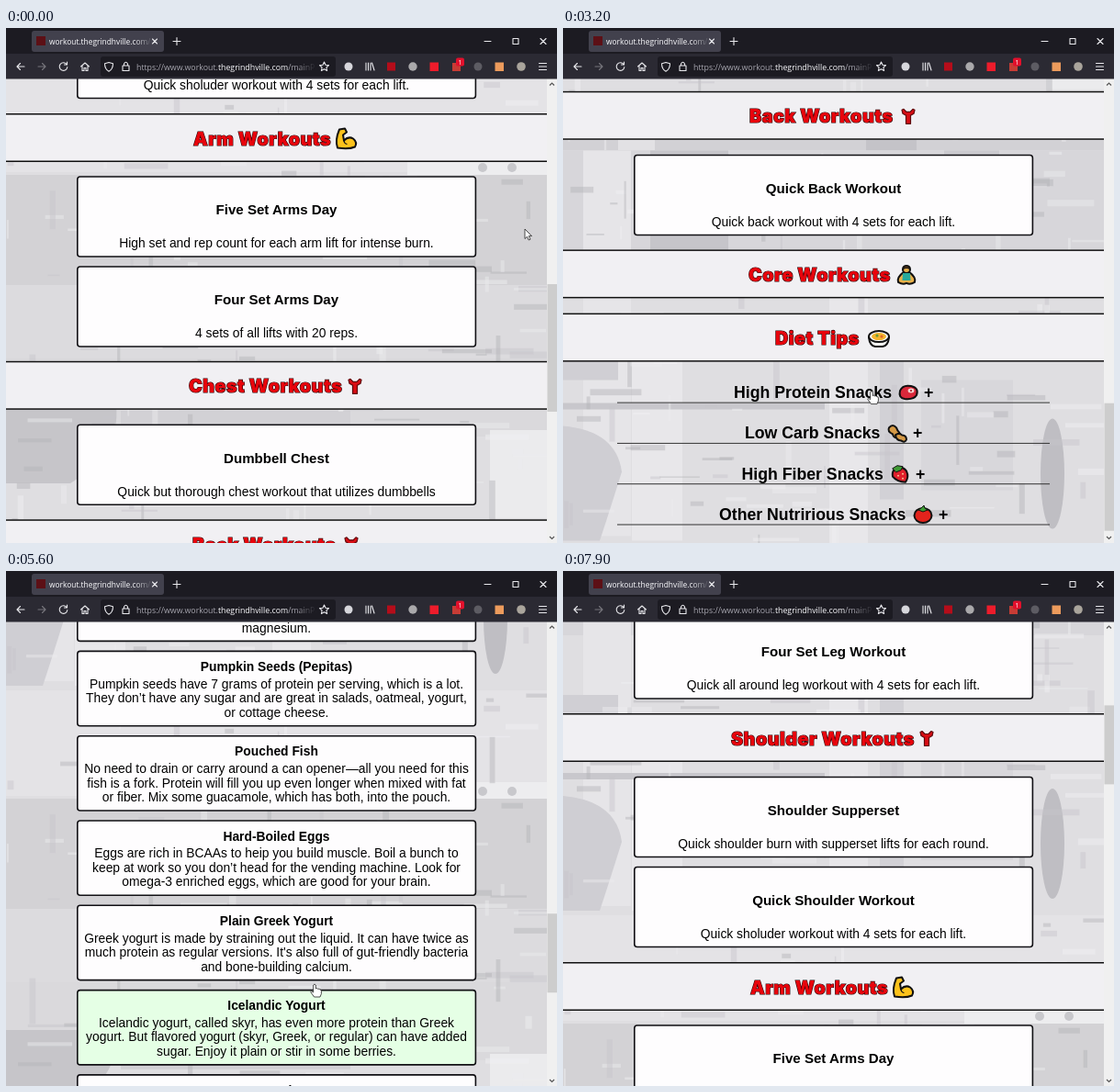
Recreate the animation shown at these times as an HTML page. Size 600 by 561 pixels, loop 8000 ms.

```html
<!DOCTYPE html>
<html lang="en">
<head>
<meta charset="utf-8">
<title>Workouts</title>
<style>
  html, body { margin: 0; width: 100%; height: 100%; overflow: hidden; background: #dfdee1; }
  svg { display: block; width: 600px; height: 561px; }
  .page text { font-family: "Liberation Sans", Arial, sans-serif; font-size: 13.85px; fill: #000; }
  .page .title { font-size: 15.1px; font-weight: 700; }
  .page .bold { font-weight: 700; }
  .page .snack { font-size: 17.7px; font-weight: 700; }
  .page .head { font: 900 19.7px "Arial Black", Inter, sans-serif; letter-spacing: .5px; fill: #e8040c; stroke: #2a0508; stroke-width: 1.2px; paint-order: stroke; }
  .card rect { fill: #fefdfe; stroke: #111014; stroke-width: 1.6; }
  .card.hover rect { fill: #e5ffe5; }
  .icon { stroke: #111; stroke-width: 2; stroke-linejoin: round; stroke-linecap: round; }
  .chrome text { font-family: "Open Sans", "Noto Sans", sans-serif; font-size: 8.8px; fill: #fbfbfe; }
  .chrome .tab { font-size: 8.4px; }
  .chrome .badge { font-size: 7.5px; }
  .chrome .dim { fill: #a5a4ad; }
  .line { fill: none; stroke: #e8e8ec; stroke-width: 1.1; stroke-linecap: round; stroke-linejoin: round; }
</style>
</head>
<body>
<svg id="stage" viewBox="0 0 600 561" xmlns="http://www.w3.org/2000/svg"></svg>
<script>
const LOOP = 8000, STEP = 100, OPEN_AT = 4000, TILE = 988;

const rect = (x, y, w, h, fill, extra = '') =>
  `<rect x="${x}" y="${y}" width="${w}" height="${h}" fill="${fill}" ${extra}/>`;
const circle = (x, y, r, fill) => `<circle cx="${x}" cy="${y}" r="${r}" fill="${fill}"/>`;
const ellipse = (x, y, rx, ry, fill) =>
  `<ellipse cx="${x}" cy="${y}" rx="${rx}" ry="${ry}" fill="${fill}"/>`;
const path = (d, fill, extra = '') => `<path d="${d}" fill="${fill}" ${extra}/>`;
const line = (d, extra = '') => path(d, 'none', `class="line" ${extra}`);
const text = (x, y, label, cls = '', anchor = 'middle') =>
  `<text x="${x}" y="${y}" class="${cls}" text-anchor="${anchor}">${label}</text>`;

// Small pictograms, each centred on 0,0
const icons = {
  arm: path('M-8-10L-2-11L0-7L-4-4L-3 2Q2-3 7 0Q12 4 9 9Q2 12-10 10Q-13 2-8-10Z', '#fcc21b') +
    path('M-3 2Q-3 5 0 6', 'none', 'stroke-width="1.2"'),
  torso: path('M-7-7L-5-8L-2-5H2L5-8L7-7L6-3L2.500-1V8H-2.500V-1L-6-3Z', '#d80d14', 'stroke="#5d090c" stroke-width="1.2"'),
  yoga: path('M-3-3Q-11 3-9 8Q-4 11 0 9Q4 11 9 8Q11 3 3-3Z', '#e8b04a') + circle(0, -6, 4, '#e8b04a') +
    path('M-4-6Q0-14 4-6Q0-9-4-6', '#5a3a1e', 'stroke-width="1"') +
    path('M-4-2H4L4.500 6H-4.500Z', '#27a99b', 'stroke="none"'),
  bowl: path('M-11-1Q-10 8-4 9H4Q10 8 11-1Z', '#f4f4f2') + ellipse(0, -2, 11, 6, '#fff') +
    `<g stroke="none">${ellipse(0, -2, 8, 4, '#f3b52f')}${circle(-2, -3, 1.6, '#6a9b3a')}${circle(3, -2, 1.6, '#e2662b')}</g>`,
  steak: path('M-9-2Q-6-9 3-7Q12-5 9 3Q6 8-4 7Q-11 6-9-2Z', '#d9283a') +
    `<g stroke="none">${ellipse(3, -2, 3.4, 2.5, '#f6d6d2')}${circle(3, -2, 1.1, '#a3202c')}</g>`,
  peanuts: path('M-9-6Q-5-11-1-6Q0-3 2-1Q5 3 0 5Q-4 5-5 1Q-11-2-9-6Z', '#d69a46') +
    path('M-2 2Q2-1 5 2Q10 2 10 7Q8 11 4 8Q-1 8-2 2Z', '#d69a46'),
  berry: path('M-6-5Q2-10 7-3Q10 3 6 9Q-3 9-8 3Q-9-2-6-5Z', '#e0202b') +
    path('M-8-6L-3-9L3-8L1-4L-4-2Z', '#3f9b35', 'stroke-width="1"') +
    `<g stroke="none">${circle(-2, 2, .9, '#ffd9a0')}${circle(3, 0, .9, '#ffd9a0')}${circle(3, 5, .9, '#ffd9a0')}</g>`,
  tomato: ellipse(0, 1, 9.5, 8, '#e3231c') +
    path('M-5-5L0-3L5-5L2-7L1-10L-2-7Z', '#3f9b35', 'stroke-width="1"')
};
const icon = (name, x, y) => `<g class="icon" transform="translate(${x} ${y})">${icons[name]}</g>`;

const band = (y, x, label, iconName, iconX) =>
  rect(0, y, 589, 52, '#f1f0f3') + rect(0, y - .5, 589, 1.5, '#111') + rect(0, y + 51, 589, 1.5, '#111') +
  text(x, y + 34, label, 'head', 'start') + icon(iconName, iconX, y + 27);

const cardAreas = [];
function card(y, h, body, food = false) {
  cardAreas.push({ y, h, food });
  return `<g class="card"><rect x="77.8" y="${y}" width="433.6" height="${h}" rx="3"/>${body}</g>`;
}
const workout = (y, title, note) =>
  card(y, 87, text(294.5, y + 41.3, title, 'title') + text(294.5, y + 77.3, note));
const snackHead = (y, x, label, iconName, iconX, sign) =>
  text(x, y, label, 'snack', 'start') + icon(iconName, iconX, y - 6) +
  text(iconX + 17, y, sign, 'snack', 'start') + rect(59, y + 4.5, 471, 1, '#333');

const foods = [
  ['Edamame', 'They have protein, complex carbs, and fat to give you long-lasting', 'energy. Soybeans also are full of folate, vitamin K, iron, and', 'magnesium.'],
  ['Pumpkin Seeds (Pepitas)', 'Pumpkin seeds have 7 grams of protein per serving, which is a lot.', 'They don’t have any sugar and are great in salads, oatmeal, yogurt,', 'or cottage cheese.'],
  ['Pouched Fish', 'No need to drain or carry around a can opener—all you need for this', 'fish is a fork. Protein will fill you up even longer when mixed with fat', 'or fiber. Mix some guacamole, which has both, into the pouch.'],
  ['Hard-Boiled Eggs', 'Eggs are rich in BCAAs to heip you build muscle. Boil a bunch to', 'keep at work so you don’t head for the vending machine. Look for', 'omega-3 enriched eggs, which are good for your brain.'],
  ['Plain Greek Yogurt', 'Greek yogurt is made by straining out the liquid. It can have twice as', "much protein as regular versions. It's also full of gut-friendly bacteria", 'and bone-building calcium.'],
  ['Icelandic Yogurt', 'Icelandic yogurt, called skyr, has even more protein than Greek', 'yogurt. But flavored yogurt (skyr, Greek, or regular) can have added', 'sugar. Enjoy it plain or stir in some berries.'],
  ['Cottage Cheese', 'Cottage cheese is full of protein and calcium and is easy to carry to', 'work. Top it with fruit, seeds, or a few slices of tomato for a quick', 'and filling snack.'],
  ['Hummus', 'Chickpeas have both protein and fiber, so they keep you full between', 'meals. Dip carrots, peppers, or celery for some crunch and', 'extra vitamins.'],
  ['Almonds', 'A small handful has plenty of protein along with healthy fats. Keep', 'a bag at your desk so you have something ready when you', 'feel hungry.']
];
const foodCard = ([title, ...lines], i) => {
  const y = 895.1 + i * 92.3;
  return card(y, 81.3, text(294.5, y + 21.6, title, 'bold') +
    lines.map((s, n) => text(294.5, y + 40.2 + n * 15.6, s)).join(''), true);
};

// Faded gym backdrop, one repeating tile
function backdrop() {
  let seed = 7;
  const rnd = () => (seed = seed * 16807 % 2147483647) / 2147483647;
  let s = rect(0, 0, 589, TILE, '#dfdee1') +
    rect(0, 0, 589, 125, '#d7d6da') + rect(95, 0, 85, 110, '#c6c5ca') + rect(200, 30, 330, 9, '#c8c7cc') +
    rect(415, 0, 60, 65, '#cac9ce') + rect(22, 0, 52, 420, '#e6e5e8') +
    rect(0, 190, 60, 60, '#d0cfd4') +
    rect(75, 225, 55, 200, '#e8e7ea') + rect(290, 110, 42, 320, '#e8e7ea') + rect(345, 190, 26, 190, '#d2d1d6') +
    rect(0, 275, 285, 7, '#c8c7cc') + path('M0 300Q58 305 64 350Q50 395 40 425H0Z', '#cfced3') +
    rect(390, 250, 100, 120, '#d8d7db') + ellipse(533, 352, 13, 60, '#bfbec3') +
    rect(0, 430, 589, 115, '#e4e3e6') + rect(437, 530, 152, 20, '#ededef') +
    circle(519, 540, 5, '#c8c8cc') + circle(551, 540, 5, '#c8c8cc') +
    rect(0, 548, 589, 120, '#d3d2d5') + rect(0, 668, 589, 80, '#dcdbde') +
    rect(0, 748, 589, 85, '#dad9dc') + path('M0 800H120Q125 850 70 884H0Z', '#c6c5c9') +
    rect(125, 805, 250, 38, '#d2d1d5') + rect(527, 826, 62, 96, '#ebebed') +
    rect(0, 924, 589, 64, '#d2d1d5') + rect(60, 924, 40, 64, '#e2e1e4') + rect(330, 930, 55, 58, '#c4c3c8');
  const shades = ['#f0eff2', '#c5c4c9', '#b2b1b6', '#ebeaed'];
  for (let i = 0; i < 340; i++) {
    const upright = rnd() < .4, len = 8 + rnd() * 50, thick = 1.5 + rnd() * 6;
    const x = rnd() * 575, y = rnd() * (TILE - 20);
    const w = Math.min(upright ? thick : len, 589 - x), h = Math.min(upright ? len : thick, TILE - y);
    s += rect(x.toFixed(1), y.toFixed(1), w.toFixed(1), h.toFixed(1), shades[Math.floor(rnd() * 4)], 'opacity=".45"');
  }
  return s;
}

const page = [
  workout(-281, 'Four Set Leg Workout', 'Quick all around leg workout with 4 sets for each lift.'),
  band(-177.5, 183, 'Shoulder Workouts', 'torso', 396),
  workout(-108.5, 'Shoulder Supperset', 'Quick shoulder burn with supperset lifts for each round.'),
  workout(-10.5, 'Quick Shoulder Workout', 'Quick sholuder workout with 4 sets for each lift.'),
  band(93.5, 204, 'Arm Workouts', 'arm', 371),
  workout(162, 'Five Set Arms Day', 'High set and rep count for each arm lift for intense burn.'),
  workout(260, 'Four Set Arms Day', '4 sets of all lifts with 20 reps.'),
  band(363.3, 199, 'Chest Workouts', 'torso', 380),
  workout(432.2, 'Dumbbell Chest', 'Quick but thorough chest workout that utilizes dumbbells'),
  band(535.8, 203, 'Back Workouts', 'torso', 376),
  workout(605, 'Quick Back Workout', 'Quick back workout with 4 sets for each lift.'),
  band(708.4, 202, 'Core Workouts', 'yoga', 374),
  band(777.6, 231, 'Diet Tips', 'bowl', 344)
].join('');

const closedList = [
  [186, 'High Protein Snacks', 'steak', 376],
  [198, 'Low Carb Snacks', 'peanuts', 364],
  [194.5, 'High Fiber Snacks', 'berry', 367],
  [170, 'Other Nutririous Snacks', 'tomato', 392]
].map(([x, label, ic, ix], i) => snackHead(869.6 + i * 44.3, x, label, ic, ix, '+')).join('');
const openList = snackHead(869.6, 188, 'High Protein Snacks', 'steak', 378, '-') + foods.map(foodCard).join('');

const address = '<tspan class="dim">https://www.workout.</tspan>thegrindhville.com<tspan class="dim">/mainPage</tspan>';
const chrome = rect(0, 0, 600, 28, '#1c1b22') + rect(0, 28, 600, 27.5, '#2b2a33') +
  rect(28, 3, 144, 23, '#42414d', 'rx="3"') + rect(33, 9, 10, 10, '#5c1016') +
  `<g mask="url(#tabFade)">${text(47, 17.6, 'workout.thegrindhville.com/mainPage', 'tab', 'start')}</g>` +
  line('M159.5 12l5 5m0-5l-5 5M182 14.5h8m-4-4v8M521 14.5h7M552 11.5h6v6h-6zM582 11.5l6 6m0-6l-6 6') +
  line('M20 42h-8m3.5-3.5l-3.5 3.5l3.5 3.5') +
  line('M35 42h8m-3.5-3.5l3.5 3.5l-3.5 3.5', 'opacity=".4"') +
  line('M66 39.5a4.3 4.3 0 1 0 .8 3M66.5 37v3h-3M81.5 42l4.5-4l4.5 4M83 41v5.5h2v-3h2v3h2V41') +
  rect(103, 31, 256, 22, '#1c1b22', 'rx="3"') +
  line('M112 37.5l4.5 1.2q0 6-4.5 8.5q-4.5-2.5-4.5-8.5zM127 41h7v5.5h-7zM128.5 41v-2q2-3.5 4 0v2') +
  `<g mask="url(#urlFade)">${text(142, 45.5, address, '', 'start')}</g>` +
  line('M346.5 37l1.5 3.2l3.5.4l-2.6 2.4l.7 3.5l-3.1-1.8l-3.1 1.8l.7-3.5l-2.6-2.4l3.5-.4z') +
  circle(373, 42, 4.5, '#d7d7dc') +
  line('M392 38v8m2.5-8v8m2.5-8v8m1.5-8l2.5 8') +
  rect(415, 37.5, 9, 9, '#b50d1a') + circle(443, 42, 4.7, '#aaa9ab') + rect(461.5, 37.5, 9.5, 9.5, '#ed1c2b') +
  rect(486, 38, 9, 9, '#c73c35') + rect(490, 32.5, 9, 9, '#e2102c', 'rx="2"') +
  text(494.5, 39.8, '1', 'badge') +
  circle(514, 42, 4.5, '#5d5c63') + rect(532.5, 37.5, 9.5, 9.5, '#ec9b5c') + circle(561, 42, 4.8, '#aaa59c') +
  line('M580.5 38.5h8m-8 3.5h8m-8 3.5h8');

const fade = (id, from, to) =>
  `<linearGradient id="${id}G" gradientUnits="userSpaceOnUse" x1="${from}" x2="${to}"><stop stop-color="#fff"/><stop offset="1"/></linearGradient>
   <mask id="${id}" maskUnits="userSpaceOnUse" x="0" y="0" width="${to}" height="56">${rect(0, 0, to, 56, `url(#${id}G)`)}</mask>`;

document.getElementById('stage').innerHTML = `
  <defs>${fade('tabFade', 140, 160)}${fade('urlFade', 316, 338)}<g id="tile">${backdrop()}</g></defs>
  <g class="page"><g id="doc">
    ${[0, 1, 2].map(i => `<use href="#tile" y="${i * TILE - 388}"/>`).join('')}
    ${page}<g id="closed">${closedList}</g><g id="open">${openList}</g>
  </g></g>
  ${rect(589, 55, 11, 506, '#f0f0f0')}<rect id="thumb" x="589.5" width="10.5" fill="#cdcdcd"/>
  ${path('M592 62.5l2.5-2.5l2.5 2.5M592 554l2.5 2.5l2.5-2.5', 'none', 'stroke="#555" stroke-width="1.2"')}
  <g class="chrome">${chrome}</g>
  <g id="cursor" stroke="#222" stroke-width=".8" stroke-linejoin="round">
    ${path('M0 0V10.5L2.5 8.3L4.2 12L6 11.2L4.3 7.6H7.5Z', '#fff', 'id="arrow"')}
    ${path('M-1.3 1Q0-1 1.3 1V5Q2.5 4 3.6 5.3Q5 4.6 5.7 6Q7.5 5.8 7.4 7.5V10.5L6 14H-.5L-4.3 8.5Q-4 7-1.3 9Z', '#fff', 'id="hand"')}
  </g>`;

const byId = id => document.getElementById(id);
const [doc, closed, open, thumb, cursor, arrow, hand] =
  ['doc', 'closed', 'open', 'thumb', 'cursor', 'arrow', 'hand'].map(byId);
const cards = [...document.querySelectorAll('.card')];

function track(keys, t) {
  if (t <= keys[0][0]) return keys[0][1];
  for (let i = 1; i < keys.length; i++) {
    const [t0, a] = keys[i - 1], [t1, b] = keys[i];
    if (t <= t1) return a + (b - a) * (t - t0) / (t1 - t0);
  }
  return keys[keys.length - 1][1];
}
const scrollKeys = [[100, 0], [1400, 466.5], [4280, 466.5], [4400, 513.5], [5050, 1130], [5150, 1130],
  [5600, 900], [6500, 266.3], [7000, 56], [7900, -333]];
const xKeys = [[400, 565], [1700, 527], [2000, 527], [3000, 336], [4300, 336], [5600, 336], [6500, 332], [7000, 336]];
const yKeys = [[400, 219], [1700, 221], [2000, 221], [3000, 395], [4000, 398], [4300, 450]];

function render(t) {
  const scroll = track(scrollKeys, t), isOpen = t >= OPEN_AT;
  const x = track(xKeys, t), y = track(yKeys, t);
  doc.setAttribute('transform', `translate(0 ${-scroll})`);
  closed.style.display = isOpen ? 'none' : '';
  open.style.display = isOpen ? '' : 'none';

  const ratio = isOpen ? .184 : .278;
  thumb.setAttribute('y', 68 + (scroll + 759) * ratio);
  thumb.setAttribute('height', isOpen ? 86 : 139);

  // Hover trails the scroll slightly
  const pointY = y + track(scrollKeys, t - 20);
  let pointing = !isOpen && Math.abs(pointY - 864) < 14;
  cardAreas.forEach((c, i) => {
    const over = (isOpen || !c.food) && x > 78 && x < 511 && pointY >= c.y && pointY <= c.y + c.h;
    cards[i].classList.toggle('hover', over);
    pointing = pointing || over;
  });
  cursor.setAttribute('transform', `translate(${x} ${y})`);
  cursor.style.display = t >= 7800 ? 'none' : '';
  arrow.style.display = pointing ? 'none' : '';
  hand.style.display = pointing ? '' : 'none';
}

const start = performance.now();
function tick(now) {
  const t = Math.max(0, now - start) % LOOP;
  render(Math.floor(t / STEP) * STEP);
  requestAnimationFrame(tick);
}
render(0);
requestAnimationFrame(tick);
</script>
</body>
</html>
```
